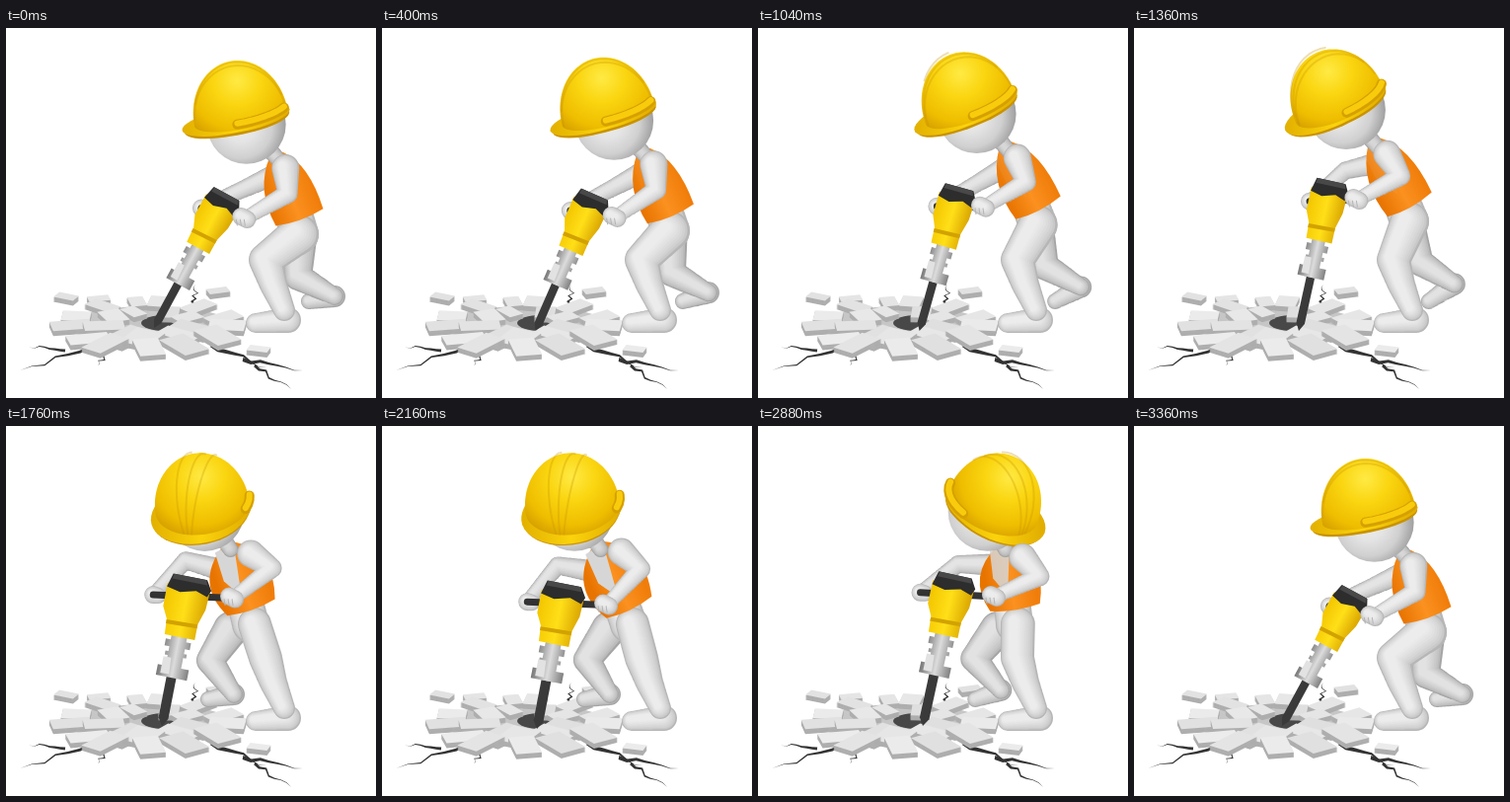
These frames come from a looping animation (375x375 px, 3440 ms). An HTML page with a canvas:

```html
<!DOCTYPE html>
<html>
<head>
<meta charset="utf-8">
<style>
html, body { margin: 0; width: 100%; height: 100%; overflow: hidden; background: #fff; }
canvas { display: block; }
</style>
</head>
<body>
<canvas id="stage" width="375" height="375"></canvas>
<script>
const c = document.getElementById('stage').getContext('2d');
const STEP = 80, COUNT = 43, TAU = Math.PI * 2;

// ms, helmet x, y, yaw, pitch, hem x, drill top x, y, tip x, body turn (0 profile, 1 front)
const KEYS = [
  [0, 238, 90, 88, 11, 297, 223, 171, 150, 0],
  [800, 220, 83, 84, 18, 287, 207, 166, 161, .04],
  [1360, 208, 77, 74, 23, 279, 200, 155, 167, .08],
  [1760, 199, 82, 20, 22, 248, 187, 156, 158, 1],
  [2160, 193, 82, 17, 22, 250, 185, 160, 157, 1],
  [2880, 238, 82, -45, 26, 260, 200, 154, 167, .85]];
KEYS.push([3360, ...KEYS[0].slice(1)]);

function poseAt(ms) {
  let i = KEYS.length - 2;
  while (ms < KEYS[i][0]) i--;
  const a = KEYS[i], b = KEYS[i + 1], u = Math.min(1, (ms - a[0]) / (b[0] - a[0]));
  return a.map((v, j) => v + (b[j] - v) * u).slice(1);
}

const mix = (a, b, u) => [a[0] + (b[0] - a[0]) * u, a[1] + (b[1] - a[1]) * u];
const shift = (p, x, y) => [p[0] + x, p[1] + y];
const range = (n, f) => Array.from({ length: n }, (_, i) => f(i));

// Coordinates along and across the line a-b, with y running from a to b
function axis(a, b) {
  const len = Math.hypot(b[0] - a[0], b[1] - a[1]);
  const dx = (b[0] - a[0]) / len, dy = (b[1] - a[1]) / len;
  const at = (x, y) => [a[0] + dy * x + dx * y, a[1] - dx * x + dy * y];
  return { len, at };
}

// Middle joint of a two-part limb
function joint(a, b, upper, lower, side) {
  const { len, at } = axis(a, b);
  const cos = Math.max(-1, Math.min(1, (upper ** 2 + len ** 2 - lower ** 2) / (2 * upper * len)));
  return at(side * upper * Math.sqrt(1 - cos * cos), upper * cos);
}

function trace(points) {
  c.beginPath();
  points.forEach(p => c.lineTo(p[0], p[1]));
}

function poly(points, fill) {
  trace(points);
  c.closePath();
  c.fillStyle = fill;
  c.fill();
}

function line(points, color, width) {
  trace(points);
  c.strokeStyle = color;
  c.lineWidth = width;
  c.stroke();
}

function stops(g, colors) {
  colors.forEach((v, i) => g.addColorStop(i / (colors.length - 1), v));
  return g;
}
const ramp = (a, b, ...colors) => stops(c.createLinearGradient(...a, ...b), colors);
const glow = (x, y, r, ...colors) => stops(c.createRadialGradient(x, y, 0, x, y, r), colors);

// Rounded limb along points, shaded from the rim inwards
function tube(points, radii, lo = 182, hi = 236) {
  for (let k = 0; k <= 1; k += 1 / 8) {
    const s = Math.round(lo + (hi - lo) * Math.sqrt(k));
    c.fillStyle = `rgb(${s},${s},${s})`;
    c.beginPath();
    for (let i = 0; i < radii.length - 1; i++) {
      for (let u = 0; u <= 1; u += 1 / 16) {
        const [x, y] = mix(points[i], points[i + 1], u);
        const r = radii[i] + (radii[i + 1] - radii[i]) * u;
        const cx = x - r * k * .25, cy = y - r * k * .2;
        c.moveTo(cx + r, cy);
        c.arc(cx, cy, r * (1 - .72 * k), 0, TAU);
      }
    }
    c.fill();
  }
}

let seed;
const rnd = () => (seed = seed * 16807 % 2147483647) / 2147483647;

function slab({ x, y, a, long, wide }) {
  const u = [Math.cos(a) * long / 2, Math.sin(a) * long * .2];
  const v = [-Math.sin(a) * wide / 2, Math.cos(a) * wide * .2];
  const corners = [[-1, -1], [1, -1], [1, 1], [-1, 1]]
    .map(([i, j]) => [x + i * u[0] + j * v[0], y + i * u[1] + j * v[1]]);
  for (let d = 5; d > 0; d--) poly(corners.map(p => shift(p, 0, d)), '#aeaeae');
  const s = 222 + Math.floor(rnd() * 16);
  poly(corners, `rgb(${s},${s},${s})`);
}

function crack(from, to, width) {
  const { len, at } = axis(from, to), n = 7;
  const mid = range(n + 1, i => [i % n ? (rnd() - .5) * 6 : 0, len * i / n, width * (1 - i / n) / 2]);
  const edge = side => mid.map(([x, y, w]) => at(x + side * w, y));
  poly([...edge(1), ...edge(-1).reverse()], '#333');
}

function ellipse(x, y, rx, ry, fill) {
  c.beginPath();
  c.ellipse(x, y, rx, ry, 0, 0, TAU);
  c.fillStyle = fill;
  c.fill();
}

function ground() {
  seed = 11;
  crack([100, 321], [14, 347], 4);
  crack([60, 327], [23, 323], 3);
  crack([208, 321], [264, 344], 5);
  crack([240, 336], [301, 347], 4);
  crack([252, 342], [289, 366], 3);
  crack([102, 330], [93, 342], 3);
  crack([191, 280], [192, 260], 3);
  ellipse(145, 301, 84, 19, '#c6c6c6');
  ellipse(162, 299, 25, 8, '#484848');
  const pieces = [[61, 272], [94, 274], [215, 266], [256, 325]]
    .map(([x, y]) => ({ x, y, a: rnd() - .5, long: 22, wide: 14 }));
  for (const [n, k] of [[9, .5], [13, .86]]) {
    for (let i = 0; i < n; i++) {
      const a = (i + rnd() * .5) / n * TAU, size = 1 + .2 * Math.sin(a);
      pieces.push({
        x: 145 + 92 * k * Math.cos(a), y: 300 + 27 * k * Math.sin(a),
        a: a + rnd() - .5, long: (30 + 12 * rnd()) * size, wide: (20 + 8 * rnd()) * size
      });
    }
  }
  pieces.sort((p, q) => p.y - q.y).forEach(slab);
}

function machine(top, tip, grips, turn, shake) {
  line(grips, '#333', 7);
  const { len } = axis(top, tip), b = 94 + shake;
  const shape = (fill, ...points) => poly(points, fill);
  const steel = ramp([-16, 0], [16, 0], '#777', '#dcdcdc', '#808080');
  const block = (w, y, h) => shape(steel, [-w, y], [w, y], [w, y + h], [-w, y + h]);
  c.save();
  c.translate(...top);
  c.rotate(Math.atan2(tip[1] - top[1], tip[0] - top[0]) - Math.PI / 2);
  c.scale(.84 + .16 * turn, 1);
  shape('#3a3a3a', [-5, b], [5, b], [5, len - 8], [0, len], [-5, len - 8]);
  block(8, 58, 40);
  block(13, 64, 7);
  block(11, 76, 4);
  block(16, b - 5, 11);
  shape('#e2e2e2', [-12, b - 14], [-4, b - 14], [-3, b + 3], [-12, b + 3]);
  const paint = ramp([-22, 0], [22, 0], '#f3c600', '#ffdf18', '#d9a400');
  shape(paint, [-22, 8], [22, 8], [21, 28], [16, 44], [16, 60], [-15, 60], [-16, 44], [-22, 32]);
  shape('#d2a200', [-16, 45], [16, 44], [16, 48], [-16, 49]);
  shape('#2d2d2d', [-18, -2], [17, -2], [23, 8], [20, 15], [8, 11], [-8, 15], [-22, 12]);
  shape('#484848', [-17, -2], [16, -2], [18, 3], [-18, 3]);
  c.restore();
}

// Maps forward, sideways, up in the helmet to screen x, y and facing
function headSpace(x, y, yaw, pitch) {
  const rad = Math.PI / 180, tilt = 15 * rad;
  const [sy, sp, se] = [yaw * rad, pitch * rad, tilt].map(Math.sin);
  const [cy, cp, ce] = [yaw * rad, pitch * rad, tilt].map(Math.cos);
  return (f, s, u) => {
    const f2 = f * cp + u * sp, u2 = u * cp - f * sp, z = f2 * cy + s * sy;
    return [x - f2 * sy + s * cy, y - u2 * ce + z * se, z * ce + u2 * se];
  };
}

function helmet(at) {
  const R = 49, H = 58;
  const ring = (r, u, visor = 0) => range(48, i => {
    const a = i / 48 * TAU;
    const k = r + visor * Math.max(0, Math.cos(a)) ** 1.5;
    return at(k * Math.cos(a), k * Math.sin(a), u);
  });
  const rim = ring(R + 1, -2, 11), xs = rim.map(p => p[0]);
  poly(ring(R, -5, 10), '#c99300');
  poly(rim, ramp([Math.min(...xs), 0], [Math.max(...xs), 0], '#e2b000', '#fbd30c', '#e0ac00'));

  c.beginPath();
  for (let i = 0; i <= 40; i++) {
    const a = i / 40 * Math.PI / 2;
    ring((R - 1) * Math.cos(a), H * Math.sin(a)).forEach((p, j) => j ? c.lineTo(p[0], p[1]) : c.moveTo(p[0], p[1]));
    c.closePath();
  }
  const [lx, ly] = at(0, 0, H * .7);
  c.fillStyle = glow(lx + 4, ly + 2, 74, '#ffea44', '#fad510', '#eebd00', '#c48c00');
  c.fill();

  for (const s of [-14, 0, 14]) {
    const arc = range(25, i => i / 24 * Math.PI).map(a => at(R * .95 * Math.cos(a), s * (.3 + .7 * Math.sin(a)), H * Math.sin(a)));
    line(arc.filter(p => p[2] > 4), 'rgba(200,145,0,.3)', 2);
  }
  for (const side of [-1, 1]) {
    const band = range(9, i => (85 + i * 9) / 360 * TAU)
      .map(a => at(R * Math.cos(a), side * R * Math.sin(a), 6)).filter(p => p[2] > 0);
    line(band, '#d5a000', 10);
    line(band.map(p => shift(p, 0, -1)), '#f8cc0c', 6);
  }
}

function draw(frame) {
  const [hx, hy, yaw, pitch, hemX, topX, topY, tipX, turn] = poseAt(frame * STEP);
  const bob = frame % 2 * 3 - 1;
  const inHead = headSpace(hx, hy, yaw, pitch);
  const ball = inHead(-4, 0, -9);
  const neck = [hx + 22 + 14 * Math.sin(yaw * Math.PI / 180), hy + 38];
  const hem = [hemX, neck[1] + 64], pelvis = shift(hem, 0, 17);
  const body = axis(neck, hem), at = (x, k) => body.at(x, k * body.len);

  const top = [topX, topY + bob], tip = [tipX, 305 + bob];
  const tool = axis(top, tip);
  const hand = tool.at(28 + 18 * turn, 11), grip = tool.at(-16 - 18 * turn, 23);
  const shoulder = at(4 + 14 * turn, .24), farShoulder = at(-8 - 12 * turn, .28);
  const elbow = joint(shoulder, hand, 26, 50, 1);
  const farElbow = joint(farShoulder, grip, 32, 48, -1);

  const farHip = shift(pelvis, -20 * turn, 5);
  const heel = [333 - 102 * turn, 272 - .75 * (297 - hemX) * (1 - turn)];
  const farKnee = joint(farHip, heel, 38, 42, -1);

  c.fillStyle = '#fff';
  c.fillRect(0, 0, 375, 375);
  c.lineCap = c.lineJoin = 'round';
  ground();

  tube([heel, [heel[0] - 26, 277]], [11, 8], 165, 226);
  tube([farHip, farKnee, heel], [18, 14, 9], 165, 226);
  tube([farShoulder, farElbow, grip], [11, 9, 7], 170, 228);
  tube([[286, 296], [253, 299]], [13, 10]);
  tube([at(0, .35), pelvis], [18, 20 - turn]);
  tube([shift(pelvis, 4 * turn, 0), [263, 235], [271, 260], [282, 286]], [20 - 3 * turn, 17, 14, 11]);

  const wide = 28 + 14 * turn;
  c.beginPath();
  c.moveTo(...at(-7, 0));
  c.lineTo(...at(7, 0));
  c.quadraticCurveTo(...at(wide, .3), ...at(26, 1));
  c.quadraticCurveTo(...at(0, 1.08), ...at(-25, 1));
  c.quadraticCurveTo(...at(-wide - 4, .4), ...at(-7, 0));
  c.fillStyle = ramp(at(-25, .5), at(25, .5), '#e87400', '#fb9120', '#f07d0a');
  c.fill();
  c.globalAlpha = turn;
  poly([at(-16, .05), at(5, 0), at(-5, .8), at(-17, .5)], '#d6d6d6');
  c.globalAlpha = 1;

  tube([ball, at(0, .08)], [10, 8], 160, 215);
  c.beginPath();
  c.arc(ball[0], ball[1], 40, 0, TAU);
  c.fillStyle = glow(ball[0] - 6, ball[1] + 2, 48, '#eeeeee', '#e4e4e4', '#d0d0d0', '#989898');
  c.fill();
  helmet(inHead);

  tube([grip, shift(grip, 5, 1)], [9, 8]);
  machine(top, tip, [grip, hand], turn, frame % 2 ? -2 : 2);
  tube([shoulder, elbow, hand], [14, 10, 7]);
  tube([shift(hand, -4, -2), shift(hand, 2, 1)], [9, 9]);
  for (let i = 0; i < 3; i++) {
    const knuckle = shift(hand, i * 4 - 9, 1);
    line([knuckle, shift(knuckle, 1, 6)], '#b4b4b4', 1);
  }
}

let shown = -1;
function tick(now) {
  const frame = Math.floor(now / STEP) % COUNT;
  if (frame !== shown) draw(shown = frame);
  requestAnimationFrame(tick);
}
draw(0);
requestAnimationFrame(tick);
</script>
</body>
</html>
```
